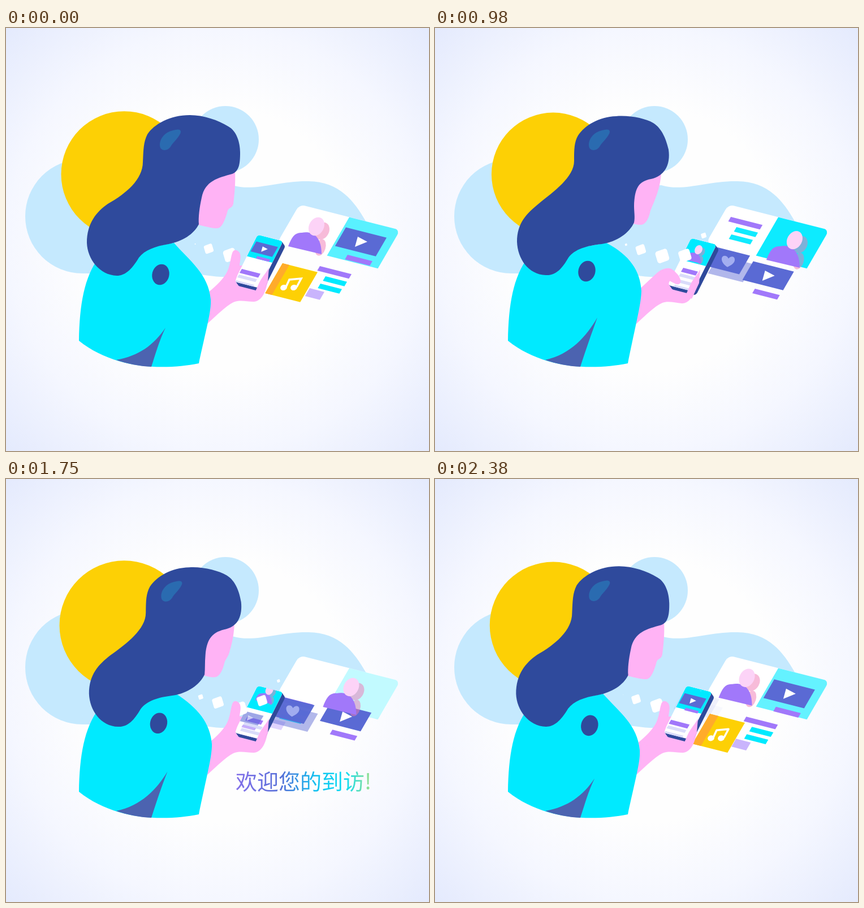
These frames come from a looping animation (748x748 px, 2450 ms). An HTML page with a canvas:

```html
<!DOCTYPE html>
<html lang="zh">
<head>
<meta charset="utf-8">
<title>Phone feed</title>
<style>
  html, body { margin: 0; width: 100%; height: 100%; overflow: hidden; }
  body { background: radial-gradient(circle at 50% 50%, #fefefe 44%, #f5f7ff 70%, #e4eafd 100%); }
  canvas { display: block; width: 748px; height: 748px; }
</style>
</head>
<body>
<canvas id="stage" width="748" height="748"></canvas>
<script>
const ctx = document.getElementById('stage').getContext('2d');
const LOOP = 2450, STEP = 70, SWITCH = 420;

const SKY = '#c5e9fe', SUN = '#fdd005', NAVY = '#2f4a9c', CYAN = '#00eaff';
const PINK = '#ffb3f5', VIOLET = '#a178fa', INDIGO = '#5a6ad4', LILAC = '#c9b4fc';

const NAME = 'ZUTWE.COM', GREETING = '欢迎您的到访!';

let time = 0;   // ms within the loop
let feed = 1;   // 1: feed layout, 0: profile layout
let lead = 0;   // early part of the way back to the feed
let swipe = 0;  // thumb pulled down over the screen

const clamp = (v, lo = 0, hi = 1) => Math.min(hi, Math.max(lo, v));
const lerp = (a, b, u) => a + (b - a) * u;
const mix = (p, q, u) => p.map((v, i) => lerp(v, q[i], u));
const arc = u => Math.sin(Math.PI * u);

function span(from, to) {
  const u = clamp((time - from) / (to - from));
  return u * u * (3 - 2 * u);
}

// Rises to 1 at the layout switch, then decays.
const jolt = lag => time < SWITCH ? span(0, SWITCH) : Math.exp((SWITCH - time) / lag);

// From the feed spot to the entry point, settling at home, and back.
function place(feedSpot, entry, home, lag = 110, back = feed) {
  return mix(time < SWITCH ? entry : mix(home, entry, jolt(lag)), feedSpot, back);
}

// Blend two path strings of the same structure.
function blend(a, b, u) {
  const nums = b.match(/[\d.]+/g);
  let i = 0;
  return a.replace(/[\d.]+/g, n => lerp(+n, +nums[i++], u));
}

function fill(path, color) {
  ctx.fillStyle = color;
  ctx.fill(new Path2D(path));
}

function oval(x, y, rx, ry, rot, color) {
  ctx.fillStyle = color;
  ctx.beginPath();
  ctx.ellipse(x, y, rx, ry, rot, 0, 7);
  ctx.fill();
}

function local([x, y], draw, scale = 1) {
  ctx.save();
  ctx.translate(x, y);
  ctx.scale(scale, scale);
  draw();
  ctx.restore();
}

function faded(alpha, draw) {
  ctx.save();
  ctx.globalAlpha *= clamp(alpha);
  draw();
  ctx.restore();
}

// Tilted rectangle lying on the floating plane.
function slab(x, y, w, h, color, r = 0, lean = -0.58) {
  ctx.save();
  ctx.transform(1, 0.255, lean, 1, x, y);
  ctx.fillStyle = color;
  ctx.beginPath();
  ctx.roundRect(0, 0, w, h, r);
  ctx.fill();
  ctx.restore();
}

function avatar(spot, scale) {
  local(spot, () => {
    ctx.fillStyle = 'rgba(240,120,180,.5)';
    ctx.beginPath();
    ctx.ellipse(60, -27, 12, 16, 0.5, 0, 7);
    ctx.moveTo(66, 2);
    ctx.ellipse(57, 2, 9, 15, 0.3, 0, 7);
    ctx.fill();
    fill('M0 0C6 -16 12 -25 24 -24C34 -26 44 -24 50 -17C57 -9 59 2 59 14Z', VIOLET);
    oval(50, -35, 13, 17, 0.5, '#fcd3f7');
  }, scale);
}

function video(spot, scale) {
  local(spot, () => {
    slab(-27, -25.5, 72, 33, INDIGO);
    slab(-24, 23, 44, 8, VIOLET);
    fill('M-6 -9L11 0L-11 9Z', '#fff');
  }, scale);
}

function backdrop() {
  oval(135, 333, 101, 101, 0, SKY);
  oval(388, 197, 59, 59, 0, SKY);
  fill('M140 300L400 278C440 290 480 270 535 271C590 272 615 305 637 343L600 380L484 380'
    + 'C460 425 420 440 385 440C360 440 345 434 310 434L135 434Z', SKY);
  const u = (time - SWITCH) / (LOOP - SWITCH);
  const swell = u < 0 ? 7.5 * (1 - span(0, SWITCH)) : 10.6 * Math.sin(2.35 * u ** 1.2);
  oval(209, 258.7, 104 + swell, 104 + swell, 0, SUN);
}

function textLines() {
  const [px, py] = place([555, 421], [551, 340], [523, 334], 110, time < SWITCH ? feed : lead);
  const x = px - 52 * arc(lead), y = py + 18 * arc(lead);
  slab(x, y, 56, 8, VIOLET);
  faded(1 - 0.8 * jolt(220), () => {
    slab(x + 10, y + 18, 38, 8, CYAN);
    slab(x + 1, y + 31, 38, 8, CYAN);
  });
  faded(2 * feed, () => slab(x - 18, y + 39, 26, 14, LILAC));
}

function heartCard() {
  const spot = place([462, 398], [485, 402], [526, 414], 340);
  faded(1 - feed ** 3, () => local(spot, () => {
    slab(-17, -10, 62, 32, 'rgba(100,112,215,.5)');
    slab(-23, -25, 62, 33, INDIGO);
    fill('M-1 11C-14 3 -13 -9 -6 -9C-2 -9 0 -6 1 -4C4 -9 12 -9 12 -2C12 4 5 8 -1 11Z', '#a3aef0');
  }));
}

function musicCard() {
  const [x, y] = mix([388, 391], [489, 416], feed);
  const left = Math.max(x, 450), w = x + 62 - left, top = y + (left - x) * 0.255;
  if (w <= 0) return;
  faded(2 * feed, () => {
    slab(left, top, w, 53, SUN);
    slab(left, top, clamp(501 - left, 0, w), 53, '#ffab2b');
    local([x, y], () => {
      oval(2, 43, 6, 5, -0.3, '#fff');
      oval(20, 43, 6, 5, -0.3, '#fff');
      ctx.strokeStyle = '#fff';
      ctx.lineWidth = 3.5;
      ctx.stroke(new Path2D('M6 42L12 29L33 27L25 42'));
    });
  });
}

function panel() {
  slab(519, 312, 178, 68, '#fff', 9);
  faded(1 - 0.35 * feed - 0.65 * jolt(220) - 0.7 * arc(lead), () =>
    slab(607, 334.4, 90, 68, CYAN, [0, 9, 0, 0]));
  if (jolt(110) > 0.6) {
    local([518, 372], () => {
      ctx.transform(1, 0.25, -0.45, 1, 0, 0);
      ctx.font = '700 37px Roboto, sans-serif';
      ctx.fillStyle = VIOLET;
      ctx.fillText(NAME[0], 0, 0);
    });
  }
  textLines();
  heartCard();
  video(place([628, 378], [540, 423], [590, 438]), 1);
  avatar(place([499, 386], [572, 427], [586, 410]), 1);
  musicCard();
}

function arm() {
  fill(blend(
    'M330 490C375 455 390 440 395 420L420 420L462 418C470 430 464 445 461 456C457 472 450 483 438 484C425 484 414 480 402 485C388 492 374 507 356 523L330 530Z',
    'M330 490C375 452 388 434 402 428L420 430L466 422C470 432 466 450 462 460C456 476 448 487 437 487C424 486 412 482 402 486C388 492 374 507 356 523L330 530Z',
    swipe), PINK);
}

function fingers() {
  local([4 * swipe, 3 * swipe], () =>
    fill('M465 424C460 433 452 441 447 452L440 468L450 476L463 448Z', PINK));
  fill(blend(
    'M366 470C380 455 392 440 395 420C397 412 398 404 400 398C402 392 407 391 412 396C417 402 414 410 413 420C411 434 406 445 403 456C398 470 380 475 366 470Z',
    'M366 470C376 450 385 438 398 429C404 426 409 424 415 425C420 426 426 432 430 437C434 443 437 451 431 453C424 455 416 444 408 447C403 465 380 475 366 470Z',
    swipe), PINK);
}

function phone() {
  const w = 45, h = 83, lean = -0.5;
  local([445 + 8 * swipe, 365.5 + 6 * swipe], () => {
    for (let i = 7; i > 0; i--) slab(i * 0.7, i, w, h, NAVY, 5, lean);
    slab(0, 0, w, h, '#fff', 5, lean);
    const screen = new Path2D(), outline = new Path2D();
    outline.roundRect(0, 0, w, h, 5);
    screen.addPath(outline, new DOMMatrix([1, 0.255, lean, 1, 0, 0]));
    ctx.clip(screen);
    slab(0, 0, w, 38, CYAN, 0, lean);
    const x = -14 - 14 * feed, y = 52.5 + 8 * feed;
    slab(x, y, 26 + 7 * feed, 7, VIOLET);
    for (let i = 1; i < 4; i++) slab(x - 5 * i, y + 10 * i, 32, 5, '#dadcfa');
    faded(2 * feed, () => video(mix([-24, 70], [12, 25.5], feed), 0.53));
    faded(1 - feed ** 3, () => avatar(place([14, -4], [-16, 53], [-12, 38]), 0.5));
  });
}

// White tiles that stream along a bent track past the phone.
function tiles() {
  const track = [[332, 381, 0], [354, 389, 17], [391, 400, 25], [432, 412, 28], [469, 376, 14], [492, 342, 0]];
  const u = (time - SWITCH) / (LOOP - SWITCH);
  const phase = u < 0 ? 0.12 * (1 - span(0, SWITCH)) : 1.12 * u - 0.18 * arc(u * u);
  for (let i = 0; i < 5; i++) {
    const s = i + phase % 1, j = Math.floor(s);
    const [x, y, size] = mix(track[j], track[j + 1], s - j);
    const w = size * 0.8 * (j > 2 ? 1 - feed ** 3 : 1);
    ctx.save();
    ctx.transform(1, -0.36, 0.3, 1, x, y);
    ctx.fillStyle = '#fff';
    ctx.beginPath();
    ctx.roundRect(-w / 2, -w / 2, w, w, w * 0.2);
    ctx.fill();
    ctx.restore();
  }
}

function woman() {
  const shape = (a, b, color) => fill(blend(a, b, feed), color);
  shape('M129 553C130 490 138 440 165 405L303 380C345 402 363 430 365 465C364 490 358 510 341 593C275 606 190 602 129 553Z',
    'M129 553C130 490 138 440 165 405L297 380C325 412 358 435 362 480C363 500 357 520 341 593C275 606 190 602 129 553Z', CYAN);
  shape('M195 587C240 577 268 545 287 512C277 540 268 565 257 599C235 598 215 594 195 587Z',
    'M195 587C235 580 262 560 282 530C270 555 265 575 257 599C235 598 215 594 195 587Z', '#4c63b0');
  oval(268.5 + 5 * feed, 430 + 6 * feed, 15, 18.5, 0.25, NAVY);
  local([3 * arc(feed), arc(feed)], () => {
    shape('M400 258C398 280 393 293 388 306C385 313 383 318 381 323C377 342 370 349 362 348C357 348 352 346 345 345L350 265Z',
      'M405 254C406 275 404 295 402 311C400 319 394 317 392 323C388 338 382 354 374 354C365 355 350 350 335 347L340 265Z', PINK);
    shape('M320 156C345 154 372 160 386 168C402 178 409 198 413 215C417 243 405 262 382 267C360 271 353 283 352 315C352 325 354 335 352 344C344 362 322 378 295 382C268 385 247 391 236 406C225 425 214 438 196 437C165 436 146 408 145 378C145 345 162 328 183 311C210 289 246 264 246 235C246 215 246 202 253 190C265 172 290 157 320 156Z',
      'M325 154C350 154 375 163 393 174C408 182 414 203 414 220C414 238 413 253 400 258C375 265 352 270 346 300C342 318 340 335 341 347C332 365 312 377 288 382C263 386 245 393 235 406C222 428 210 438 196 438C165 437 144 408 143 380C143 345 160 325 180 311C212 293 242 268 242 237C243 215 243 202 250 188C262 170 290 154 325 154Z', NAVY);
    fill('M300 180C307 178 311 181 308 187C303 197 296 201 291 210C286 217 277 218 273 212C270 204 274 194 281 188C287 183 294 181 300 180Z', '#2a6bb0');
  });
}

function caption(text, x, y, width, font, bold) {
  const paint = ctx.createLinearGradient(x, 0, x + width, 0);
  paint.addColorStop(0, '#8470ea');
  paint.addColorStop(0.34, '#5570d8');
  paint.addColorStop(0.6, '#12c2f0');
  paint.addColorStop(0.82, '#10dcf2');
  paint.addColorStop(1, '#96e08c');
  ctx.font = font;
  ctx.fillStyle = ctx.strokeStyle = paint;
  ctx.fillText(text, x, y);
  if (!bold) return;
  ctx.lineWidth = 1.2;
  ctx.lineJoin = 'round';
  ctx.strokeText(text, x, y);
}

// One more letter per step.
function typing() {
  const typed = start => Math.max(0, Math.floor((time - start) / STEP) + 1);
  if (time < 945) {
    caption(NAME.slice(0, typed(280)), 395, 547.5, 205, '700 37px Roboto, sans-serif', true);
  } else if (time < 1785) {
    caption(GREETING.slice(0, typed(1050)), 406, 549, 238,
      '300 38px "Noto Sans CJK SC", "Noto Sans CJK", sans-serif', false);
  }
}

function frame() {
  time = Math.floor(performance.now() % LOOP / STEP + 0.001) * STEP % LOOP;
  feed = time < SWITCH ? 1 - span(0, SWITCH) : span(1330, 2500);
  lead = time < SWITCH ? 0 : span(1200, 2500);
  swipe = span(420, 820) - span(1000, 1450);
  ctx.clearRect(0, 0, 748, 748);
  [backdrop, panel, arm, phone, tiles, fingers, woman, typing].forEach(draw => draw());
  requestAnimationFrame(frame);
}
requestAnimationFrame(frame);
</script>
</body>
</html>
```
